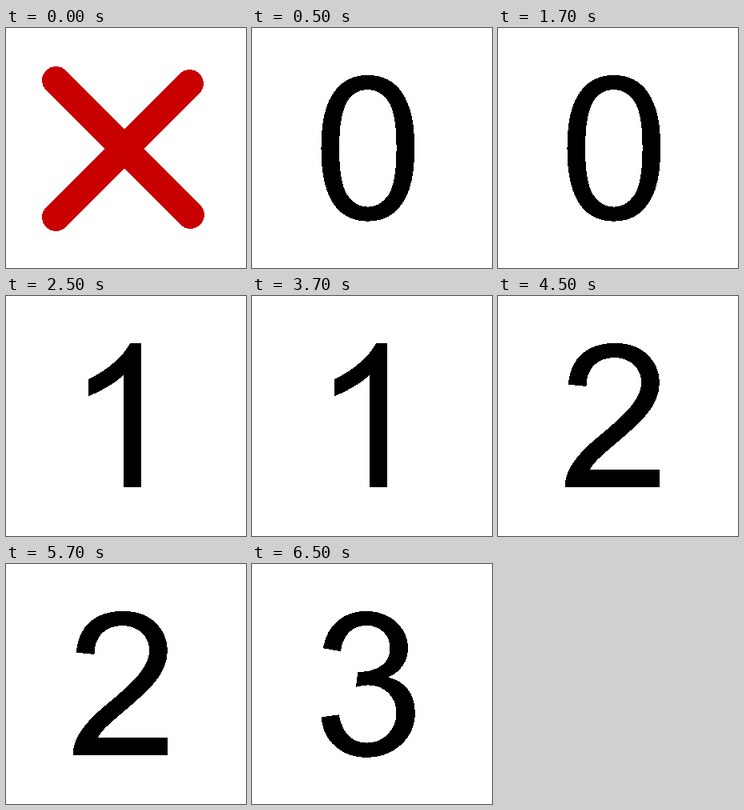
Animation, 300 px wide and 300 px high, one loop 8000 ms. Source, as an HTML page:

```html
<!DOCTYPE html>
<html lang="en">
<head>
<meta charset="utf-8">
<title>Count</title>
<style>
  html, body { margin: 0; width: 100%; height: 100%; overflow: hidden; background: #fff; }
  svg { display: block; width: 100%; height: 100%; shape-rendering: crispEdges; }
  .scene { visibility: hidden; }
  .scene.on { visibility: visible; }
</style>
</head>
<body>
<svg viewBox="0 0 300 300">
  <path class="scene on" d="M62.5 65.5L230.5 233.5M229.5 69.5L62.5 236.5"
    fill="none" stroke="#c80000" stroke-width="35" stroke-linecap="round"/>
  <!-- Digits: 2048 units per em, 250px size, y up from the baseline -->
  <g transform="translate(76.1 238.58) scale(.12207 -.12207)">
    <path class="scene" role="img" aria-label="0" d="M85 723Q85 983 138.5 1141.5T297.5 1386 563 1472
      Q681 1472 770 1424.5T917 1287.5 1008 1069.5 1041 723Q1041 465 988 306.5T829.5 61.5 563 -25
      Q351 -25 230 127Q85 310 85 723ZM270 723Q270 362 354.5 242.5T563 123 771.5 243 856 723
      Q856 1085 771.5 1204T561 1323Q437 1323 363 1218Q270 1084 270 723Z"/>
    <path class="scene" role="img" aria-label="1" d="M763 0H583V1147Q518 1085 412.5 1023T223 930V1104
      Q374 1175 487 1276T647 1472H763Z"/>
    <path class="scene" role="img" aria-label="2" d="M1031 173V0H62Q60 65 83 125Q120 224 201.5 320T437 542
      Q676 738 760 852.5T844 1069Q844 1176 767.5 1249.5T568 1323Q438 1323 360 1245T281 1029L96 1048
      Q115 1255 239 1363.5T572 1472Q783 1472 906 1355T1029 1065Q1029 977 993 892T873.5 713 596 455
      Q434 319 388 270.5T312 173Z"/>
    <path class="scene" role="img" aria-label="3" d="M86 387L266 411Q297 258 371.5 190.5T553 123
      Q680 123 767.5 211T855 429Q855 553 774 633.5T568 714Q517 714 441 694L461 852Q479 850 490 850
      Q605 850 697 910T789 1095Q789 1194 722 1259T549 1324Q444 1324 374 1258T284 1060L104 1092
      Q137 1273 254 1372.5T545 1472Q665 1472 766 1420.5T920.5 1280 974 1091Q974 996 923 918T772 794
      Q902 764 974 669.5T1046 431Q1046 236 904 105T548 -26Q360 -26 231.5 85T86 387Z"/>
  </g>
</svg>
<script>
  const LOOP = 8000, STEP = 2000, CROSS = 500;
  const scenes = document.querySelectorAll('.scene');
  const start = performance.now();

  function draw(now) {
    const t = Math.max(0, now - start) % LOOP;
    const current = Math.floor((t - CROSS) / STEP) + 1;
    scenes.forEach((scene, i) => scene.classList.toggle('on', i === current));
    requestAnimationFrame(draw);
  }
  draw(start);
</script>
</body>
</html>
```
